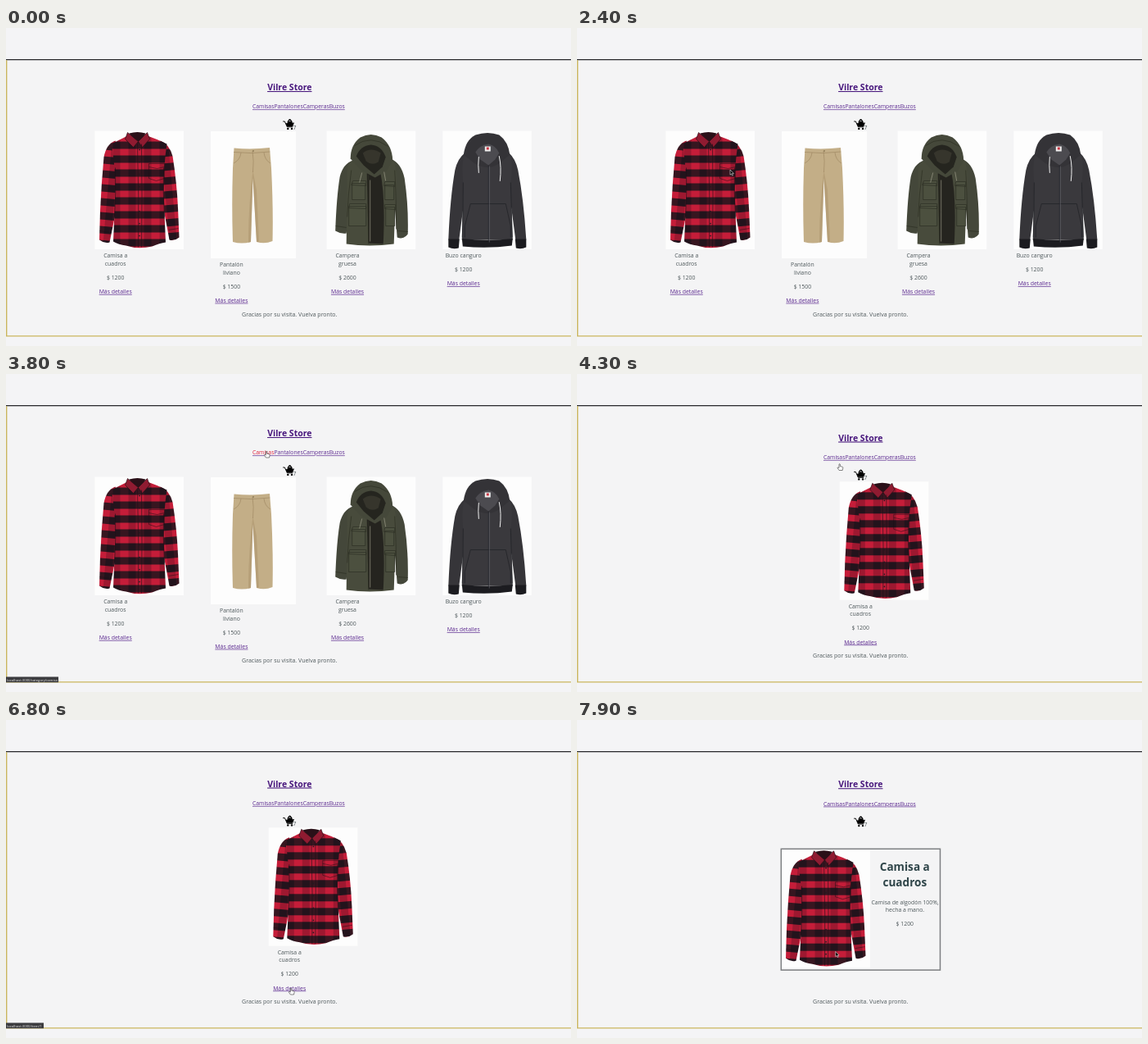
An HTML page that plays this animation: 690x388 px, repeating every 8000 ms.

```html
<!DOCTYPE html>
<html lang="es">
<head>
<meta charset="utf-8">
<title>Tienda</title>
<style>
html, body { margin: 0; width: 100%; height: 100%; overflow: hidden; background: #f4f4f6; }
svg { display: block; width: 100vw; height: 100vh; }
text { font: 6.9px "Open Sans", "Noto Sans", sans-serif; fill: #4e585b; text-anchor: middle; }
.link { fill: #5c2a90; text-decoration: underline; text-decoration-thickness: .45px; }
.brand { font-size: 10.5px; font-weight: 700; fill: #48177d; text-decoration-thickness: .8px; }
.nav { font-size: 6.8px; text-anchor: start; }
.big { font-size: 13.6px; font-weight: 700; fill: #2f4549; }
.hot { fill: #e0203c; }
.url { font-size: 4.2px; fill: #e4e4e4; text-anchor: start; }
#footer { font-size: 7px; }
</style>
</head>
<body>
<svg id="stage" viewBox="0 0 690 388">
<defs>
  <pattern id="plaid" width="19" height="17" x="3" y="5" patternUnits="userSpaceOnUse">
    <path fill="#c51d39" d="M0 0h19v17H0z"/>
    <path fill="#3a0a18" opacity=".28" d="M0 0h9v17H0z"/>
    <path fill="#1b141b" opacity=".83" d="M0 8h19v9H0z"/>
    <path fill="#17131a" opacity=".55" d="M0 8h9v9H0z"/>
  </pattern>
  <pattern id="plaidL" href="#plaid" patternTransform="rotate(5)"/>
  <pattern id="plaidR" href="#plaid" patternTransform="rotate(-5)"/>

  <g id="shirt">
    <path fill="#fdfdfd" d="M0 0h108.5v144.5H0z"/>
    <path fill="url(#plaidL)" d="M25 12Q14 16 11 32Q8 64 6.5 98L5.500 133Q12 138 18 136L27 92L32 30z"/>
    <path fill="url(#plaidR)" d="M80 12Q91 16 95 31Q100 62 101.500 94L103 130Q97 135 91 133L83 90L78 30z"/>
    <path fill="url(#plaid)" d="M38 7Q28 12 20 16Q25 40 25 75L22.500 135Q29 139 38 140Q53 145 70 141Q79 137 86.500 136L84 75Q84 40 88 16Q76 10 64 6Q50 14 38 7z"/>
    <path fill="#2a1018" d="M42 3Q52 0 62 3L58 10L53 15L46 10z"/>
    <path fill="#8f1b31" stroke="#281018" stroke-width=".7" d="M40 2L37 10L47 20L53 13zM64 2L67 10L58 20L53 13z"/>
    <path fill="none" stroke="#1c0f16" stroke-width=".6" d="M52 16Q54 80 53 142M57 16Q58 80 57 142M25 45Q26 75 24 105M84 45Q83 75 85 105"/>
    <path fill="none" stroke="#1d0e15" stroke-width=".5" d="M66 40h20M66 40v18l9 3l10-3V40M66 44l10 2l9-2M6 122l14 2M90 121l12-2"/>
    <path stroke="#201c22" stroke-width="1.7" stroke-linecap="round" stroke-dasharray="0 15" d="M54.6 23V140"/>
  </g>

  <g id="pants">
    <path fill="#fdfdfd" d="M0 0h104v155H0z"/>
    <path fill="#c3ae87" d="M28.500 20.500Q50 22.500 72 20L74 45Q76.500 95 75.500 134Q66 138 56 135L51.500 57L49 135Q38 138 27 135Q25.500 90 27 45z"/>
    <path fill="#ab946c" opacity=".55" d="M51.500 48L56 72L59 135L56 135L51.500 57L49 135L46 136Q46 90 51.500 48z"/>
    <path fill="none" stroke="#9a845e" stroke-width=".6" d="M28 25.500Q50 28 72.300 25M51 24Q53 36 51.500 50M37 26Q36 35 28 39M65 26Q66 35 73 39"/>
    <circle cx="52" cy="24" r=".8" fill="#6f5d3d"/>
  </g>

  <g id="parka">
    <path fill="#fdfdfd" d="M0 0h108.500v144.500H0z"/>
    <path fill="#44473a" d="M32 36Q20 40 16 56Q12 80 10.500 122Q17 126 24 125L30 70zM78 34Q91 39 95 58Q100 92 99 126Q94 133 86 130L82 80z"/>
    <path fill="#484b3c" d="M32 36Q23 40 25 58L24 138Q52 142 82 138L84 80Q87 52 82 37Q68 32 55 42z"/>
    <path fill="#25241f" d="M49 52Q57 43 65 48Q72 80 69 138L51 137Q50 95 49 52z"/>
    <path fill="#45483a" d="M29 34Q29 17 41 8Q54 1 67 8Q80 18 80.500 36L73 49L59 57L42 48z"/>
    <path fill="#25251f" d="M36 31Q41 18 54 17Q67 18 72 32L68 44L58 53L45 42z"/>
    <path fill="#47463a" opacity=".5" d="M44 27Q54 19 66 27L63 38Q55 43 48 37z"/>
    <path fill="#4c503f" stroke="#303327" stroke-width=".8" d="M31 64h16v20H31zM30 66l2-5h16v6zM27 92h21v24H27zM27 94l1-5h20v6zM71 66h11v18H71zM70 67l1-5h12v6zM72 93h11v23H72zM71 95v-5h13v6z"/>
    <path fill="none" stroke="#303326" stroke-width=".8" d="M51 54Q50 100 51 138M30 48Q26 78 25 105M83 48Q85 80 85 120M11 116l13 2M87 122l12 1M34 18Q54 4 75 19"/>
    <path fill="none" stroke="#aaa894" stroke-width=".6" d="M43 51L40 63M70 50L72 61M53 60Q53 100 53 135"/>
  </g>

  <g id="hoodie">
    <path fill="#fdfdfd" d="M0 0h108.500v144.500H0z"/>
    <path fill="#363539" d="M27 27Q18 34 15 48Q9 82 7 133H20L28 72zM81 27Q89 34 92 48Q99 84 102 133H89L81 72z"/>
    <path fill="#3a393d" d="M28 27Q22 33 25 65L23.500 133H85.500L83 65Q87 34 81 27Q55 45 28 27z"/>
    <path fill="#1c1c20" d="M7 132h13.500l-1 11Q13 145 7 142zM88.500 132H102v10Q96 145 89.500 143zM23.500 131.500Q55 135 85.500 131.500L84.500 140Q55 144 24.500 141z"/>
    <path fill="#343337" d="M25.500 29Q28 11 40 5Q55 0 69 5Q80 13 82 29L70 39Q55 50 38 39z"/>
    <path fill="#4c4b50" d="M40 26Q46 17 56 16Q65 18 69 27L64 35L56 42L46 35z"/>
    <path fill="#eee" d="M51.500 19h7v6h-7z"/><path fill="#c93643" d="M53.500 20h3v3h-3z"/>
    <path fill="none" stroke="#1f2024" stroke-width=".7" d="M56 42V138M25 63Q25 95 24 130M83 63Q84 95 85 130M34 89L27 116V130M77 89L83 116V130M34 89H77"/>
    <path fill="none" stroke="#7a7b80" stroke-width=".5" d="M57 43V136"/>
    <path fill="none" stroke="#f0f0f0" stroke-linecap="round" d="M44 32Q43 42 44 51M69 31Q72 44 70 61"/>
  </g>

  <g id="cart">
    <path fill="none" stroke="#080808" stroke-width="1" stroke-linecap="round" d="M338.600 114h1.800l3 6.800h6.400"/>
    <path d="M341.500 116.300L352 115.600l-1.900 4.600h-6.800z"/>
    <path d="M343.600 117q-.2-4 1.300-4.500q.2-1.500 1.700-1.500t1.700 1.500q1.600.700 1.400 4.500z"/>
    <path fill="none" stroke="#f4f4f6" stroke-width=".8" d="M345.400 114.300q1.100-3 2.200 0"/>
    <circle cx="344.300" cy="122.900" r="1.200"/><circle cx="349" cy="122.900" r="1.200"/>
  </g>
</defs>

<path fill="#f4f4f6" d="M0 0h690v388H0z"/>
<path fill="#f4f4f5" d="M1 39h689v337H1z"/>
<path fill="#26262a" d="M0 37.900h690v1.300H0z"/>
<path fill="#cbb75f" d="M0 39.200h1.400v336.100H690v1.300H0z"/>

<g id="header">
  <text class="link brand" x="346.300" y="76">Vilre Store</text>
  <text class="link nav" x="301" y="98.400"><tspan id="first">Camisas</tspan><tspan>PantalonesCamperasBuzos</tspan></text>
  <use href="#cart"/>
  <text x="352.600" y="123.700">7</text>
</g>
<g id="pages"></g>
<text id="footer" x="346.300">Gracias por su visita. Vuelva pronto.</text>
<g id="status"><path id="bar" fill="#3b3b3e"/><text id="url" class="url" x="1.200" y="374.600"></text></g>
<g id="cursor">
  <path id="arrow" fill="#0a0a0a" stroke="#fff" stroke-width=".5" d="M0 0V6.200L1.500 4.900L2.500 7.100L3.500 6.600L2.500 4.500H4.400z"/>
  <path id="hand" fill="#fff" stroke="#222" stroke-width=".55" stroke-linejoin="round" d="M-.7.500Q0-.4.600.500V3.100L3.300 3.700Q4.300 4 4.100 5.200L3.500 8H-.6L-2.600 5.200Q-2.600 4.100-1.500 4.500L-.7 5.200z"/>
</g>
</svg>
<script>
const $ = id => document.getElementById(id);
const LOOP = 8000, STEP = 100;

const label = (x, y, str, cls = "") => `<text x="${x}" y="${y}" class="${cls}">${str}</text>`;
const image = (id, x, y) => `<use href="#${id}" transform="translate(${x} ${y})"/>`;
const frame = (x, y, w, h) =>
  `<rect x="${x}" y="${y}" width="${w}" height="${h}" fill="none" stroke="#7d7f82" stroke-width="1.5"/>`;

// Product card: picture, name lines, price and link
function card(id, ix, iy, cx, y, lines, price) {
  const end = y + (lines.length - 1) * 9.8;
  return image(id, ix, iy)
    + lines.map((s, i) => label(cx, y + i * 9.8, s)).join("")
    + label(cx, end + 17, "$ " + price)
    + label(cx, end + 34.1, "Más detalles", "link");
}

// Each page: start time, header shift, footer baseline, content
const shirtName = ["Camisa a", "cuadros"];
const pages = [
  { from: 0, dy: 0, foot: 351.7, html:
    card("shirt", 108.5, 125.5, 133.7, 280, shirtName, 1200)
    + card("pants", 250, 126, 275.4, 290.8, ["Pantalón", "liviano"], 1500)
    + card("parka", 391.7, 125.5, 417, 280, ["Campera", "gruesa"], 2600)
    + card("hoodie", 533.3, 125.5, 558.7, 280, ["Buzo canguro"], 1200) },
  { from: 3900, dy: 106, foot: 246, html: "" },
  { from: 4200, dy: 5.5, foot: 346.2, html:
    card("shirt", 320.8, 131.3, 346.2, 285.6, shirtName, 1200) },
  { from: 7000, dy: 84, foot: 267.8, html:
    frame(321.7, 217, 49.2, 28.4) + label(344, 225.7, "Imagen")
    + label(344, 235.5, "producto") + label(368, 235.5, "$") },
  { from: 7500, dy: 6.2, foot: 345.7, html:
    image("shirt", 249.5, 157.7) + frame(249.3, 157.3, 194.2, 147.8)
    + label(400.3, 183.6, "Camisa a", "big") + label(400.3, 203, "cuadros", "big")
    + label(400.5, 224.5, "Camisa de algodón 100%,") + label(400.5, 234.3, "hecha a mano.")
    + label(400.3, 251.3, "$ 1200") }
];
$("pages").innerHTML = pages.map(p => `<g>${p.html}</g>`).join("");

// Pointer path: time, x, y
const path = [
  [0, 700, 245], [500, 700, 245], [1400, 440, 200], [2300, 189, 175], [2400, 187, 173],
  [3200, 309, 94.5], [3300, 318, 94], [4000, 318, 94], [4300, 320.7, 109.5],
  [5000, 345, 119], [5100, 367, 231], [5200, 367, 231], [5300, 371, 245], [5800, 348, 305],
  [6000, 348, 305], [6300, 355, 331], [6500, 348, 327], [7400, 348, 327], [7900, 315.7, 282.5],
  [8000, 315.7, 282.5]
];
const within = (t, a, b) => t >= a && t < b;
const show = (el, on) => el.setAttribute("visibility", on ? "visible" : "hidden");

function pointer(t) {
  const i = path.findIndex((p, n) => n && t <= p[0]);
  const [t0, x0, y0] = path[i - 1], [t1, x1, y1] = path[i];
  const k = (t - t0) / (t1 - t0);
  return [x0 + (x1 - x0) * k, y0 + (y1 - y0) * k];
}

function draw(time) {
  const t = Math.floor((time % LOOP) / STEP) * STEP;
  const now = pages.filter(p => t >= p.from).length - 1;
  const page = pages[now];
  [...$("pages").children].forEach((g, i) => g.setAttribute("display", i === now ? "inline" : "none"));
  $("header").setAttribute("transform", `translate(0 ${page.dy})`);
  $("footer").setAttribute("y", page.foot);

  const onNav = within(t, 3200, 4200), onItem = within(t, 6700, 7000);
  $("first").setAttribute("class", within(t, 3200, 3900) ? "hot" : "");
  show($("status"), onNav || onItem);
  $("bar").setAttribute("d", `M0 369.500h${onItem ? 46 : 64}v6.700H0z`);
  $("url").textContent = "localhost:3000/" + (onItem ? "item/1" : "category/camisa");

  const hand = within(t, 3200, 5100) || within(t, 6300, 7000);
  show($("hand"), hand);
  show($("arrow"), !hand);
  $("cursor").setAttribute("transform", `translate(${pointer(t)})`);
}

const start = performance.now();
function tick() {
  draw(performance.now() - start);
  requestAnimationFrame(tick);
}
tick();
</script>
</body>
</html>
```
